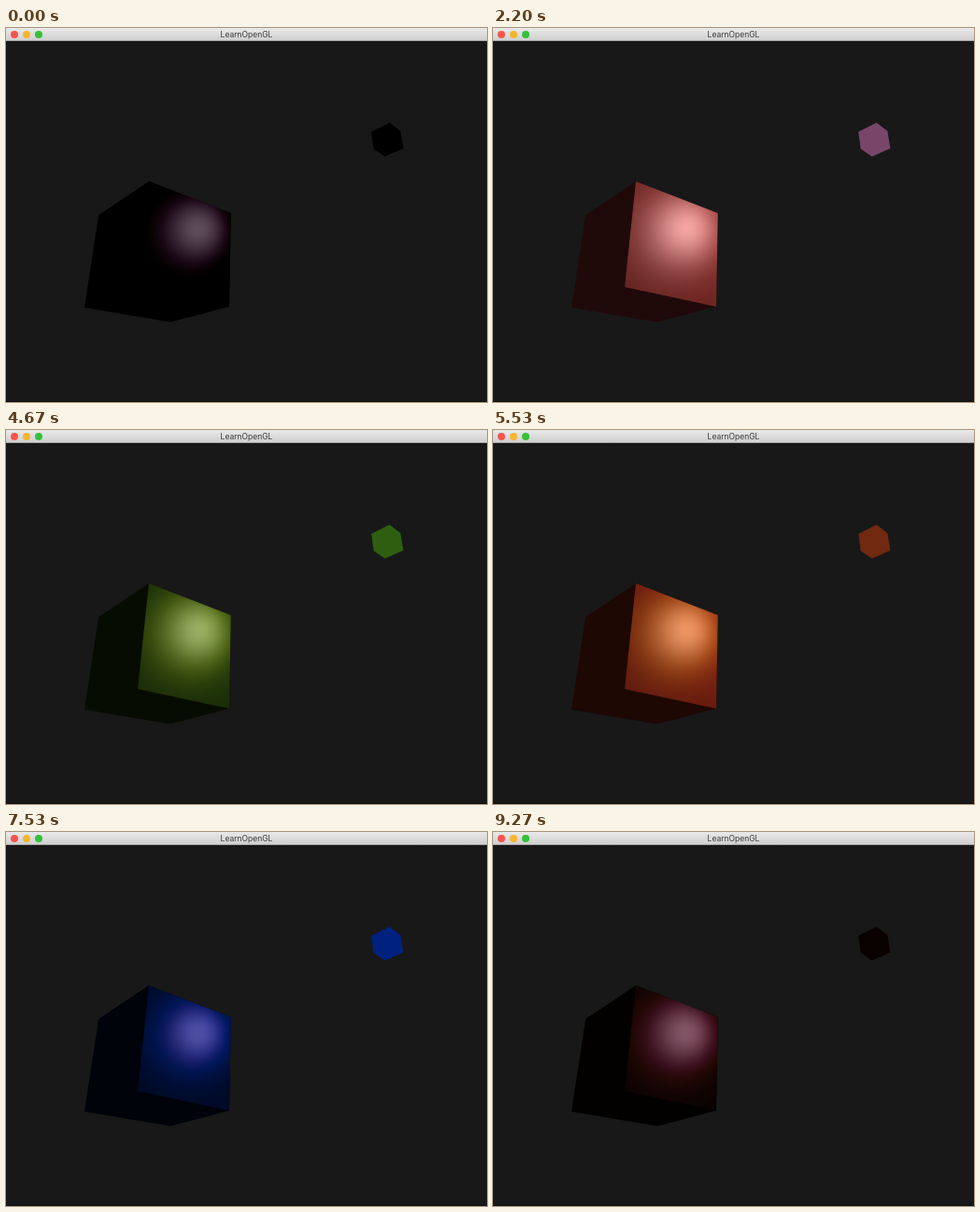
Animation, 515 px wide and 400 px high, one loop 9340 ms. Source, as an HTML page with a canvas:

```html
<!DOCTYPE html>
<html lang="en">
<head>
<meta charset="utf-8">
<title>LearnOpenGL</title>
<style>
  html, body { margin: 0; width: 515px; height: 400px; overflow: hidden; background: #181818; }
  canvas { display: block; }
  header {
    position: absolute; inset: 0 auto auto 0; width: 515px; height: 14px; box-sizing: border-box;
    background: linear-gradient(#e9e9e9, #d0d0d0); border-bottom: 1px solid #aaa;
    font: 8.5px/14px Inter, sans-serif; color: #3c3c3c; text-align: center;
  }
  i { position: absolute; top: 3px; width: 8px; height: 8px; border-radius: 50%; }
</style>
</head>
<body>
<canvas width="515" height="400"></canvas>
<header>
  <i style="left:5px;background:#f5554c"></i>
  <i style="left:18px;background:#f6b52e"></i>
  <i style="left:31px;background:#35c03b"></i>
  LearnOpenGL
</header>
<script>
const ctx = document.querySelector('canvas').getContext('2d');
const LOOP = 9340, FPS = 15, START = -1.45;
const LIGHT = [1.2, 1, 2], EYE = [-2.29, -1.52, 3.74];
const MATERIAL = [1, 0.5, 0.31], SPEEDS = [2, 0.7, 1.3];
const AMBIENT = 0.13, DIFFUSE = 0.5, SPECULAR = 0.5, SHININESS = 32;

// Perspective rows [base, x, y, -z], measured from the cube's front lower left corner
const PX = [141, 137.9, 29.1, -41.8];
const PY = [277, 70.8, -94.6, 76.1];
const PW = [1, 0.167, 0.112, 0.181];

const dot = (a, b) => a[0] * b[0] + a[1] * b[1] + a[2] * b[2];
const toward = (from, to) => {
  const d = to.map((c, i) => c - from[i]), len = Math.hypot(...d);
  return d.map(c => c / len);
};

function project([x, y, z]) {
  const apply = p => p[0] + p[1] * (x + 0.5) + p[2] * (y + 0.5) + p[3] * (0.5 - z);
  const w = apply(PW);
  return [apply(PX) / w, apply(PY) / w];
}

// The three faces turned to the camera: front, left, bottom
function visibleFaces(center, size) {
  const at = (...c) => project(c.map((v, i) => center[i] + v * size / 2));
  const a = at(-1, -1, 1), b = at(1, -1, 1), c = at(1, 1, 1), d = at(-1, 1, 1);
  const e = at(-1, -1, -1), f = at(1, -1, -1), g = at(-1, 1, -1);
  return [[a, b, c, d], [e, a, d, g], [e, f, b, a]];
}

function outline(faces) {
  const path = new Path2D();
  for (const face of faces) {
    face.forEach(([x, y], i) => i ? path.lineTo(x, y) : path.moveTo(x, y));
    path.closePath();
  }
  return path;
}

// Linear-light mix that models the display's colour primaries
function display(rgb) {
  const [r, g, b] = rgb.map(c => Math.min(1, Math.max(0, c)) ** 2.2);
  return [0.84 * r + 0.16 * g, 0.03 * r + 0.92 * g + 0.05 * b, 0.01 * r + 0.02 * g + 0.97 * b]
    .map(c => 255 * c ** (1 / 2.2));
}
const css = rgb => `rgb(${display(rgb).map(Math.round)})`;

const faces = visibleFaces([0, 0, 0], 1);
const cube = outline(faces), front = outline([faces[0]]);
const lamp = outline(visibleFaces(LIGHT, 0.2));

// Diffuse and specular strength for every pixel around the front face
const box = { x: 138, y: 161, w: 106, h: 140 };
const shading = [];
for (let j = 0; j < box.h; j++) {
  for (let i = 0; i < box.w; i++) {
    const X = box.x + i + 0.5, Y = box.y + j + 0.5;
    const a = PX[1] - PW[1] * X, b = PX[2] - PW[2] * X, c = PY[1] - PW[1] * Y, d = PY[2] - PW[2] * Y;
    const p = X - PX[0], q = Y - PY[0], det = a * d - b * c;
    const point = [(p * d - b * q) / det - 0.5, (a * q - c * p) / det - 0.5, 0.5];
    const light = toward(point, LIGHT);
    const reflected = [-light[0], -light[1], light[2]];
    const shine = Math.max(0, dot(reflected, toward(point, EYE))) ** SHININESS;
    shading.push([Math.max(0, light[2]), shine]);
  }
}

const faceCanvas = document.createElement('canvas');
faceCanvas.width = box.w;
faceCanvas.height = box.h;
const faceCtx = faceCanvas.getContext('2d');
const pixels = faceCtx.createImageData(box.w, box.h);

function draw(seconds) {
  const light = SPEEDS.map(s => Math.sin(s * (seconds + START)));
  const lit = light.map((c, i) => c * MATERIAL[i]);

  ctx.fillStyle = '#181818';
  ctx.fillRect(0, 0, 515, 400);
  ctx.fillStyle = '#0e0e0e';
  ctx.fillRect(0, 399, 515, 1);
  ctx.fillStyle = css(light.map(c => c * DIFFUSE));
  ctx.fill(lamp);
  ctx.fillStyle = css(lit.map(c => c * AMBIENT));
  ctx.fill(cube);

  shading.forEach(([diffuse, shine], n) => {
    const color = display(lit.map(c => c * (AMBIENT + DIFFUSE * diffuse) + SPECULAR * shine));
    pixels.data.set([...color, 255], n * 4);
  });
  faceCtx.putImageData(pixels, 0, 0);
  ctx.save();
  ctx.clip(front);
  ctx.drawImage(faceCanvas, box.x, box.y);
  ctx.restore();
}

let shown = -1;
function tick() {
  const step = Math.floor((performance.now() % LOOP) * FPS / 1000 + 0.06);
  if (step !== shown) draw((shown = step) / FPS);
  requestAnimationFrame(tick);
}
tick();
</script>
</body>
</html>
```
